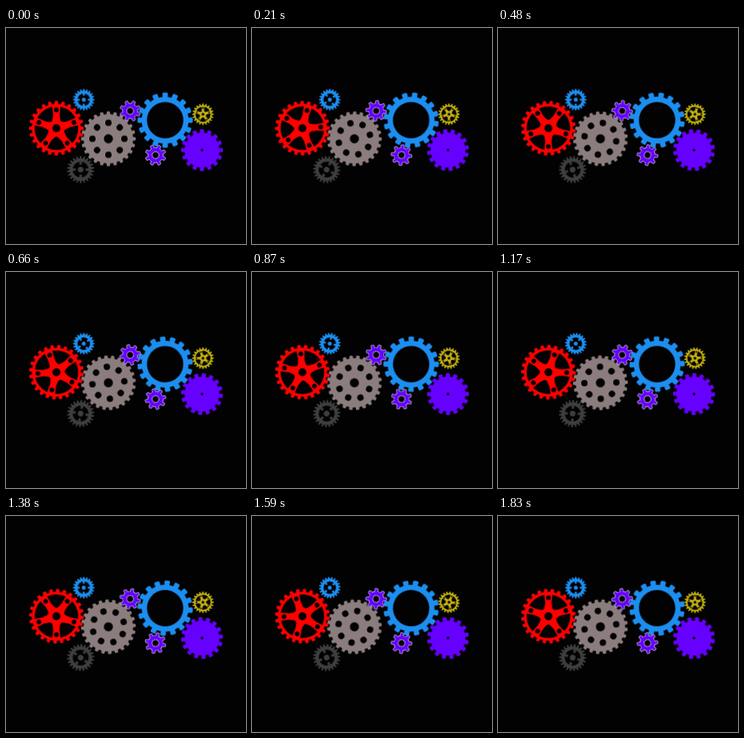
Write an HTML page that moves like this. It is 300 px wide and 270 px high and loops after 1860 ms.

```html
<!DOCTYPE html>
<html lang="en">
<head>
<meta charset="utf-8">
<title>Turning gears</title>
<style>
  html, body { margin: 0; width: 100%; height: 100%; overflow: hidden; background: #020202; }
  svg { display: block; width: 300px; height: 270px; }
  /* A short rest, then one step every 30 ms. */
  .wheel { animation: turn 1860ms -1ms infinite; }
  @keyframes turn {
    0% { transform: rotate(0deg); animation-timing-function: step-end; }
    1.6129% { transform: rotate(0deg); animation-timing-function: steps(61, end); }
    100% { transform: rotate(calc(var(--step) * 61deg)); }
  }
</style>
</head>
<body>
<svg id="stage" viewBox="0 0 300 270"></svg>
<script>
// Degrees per step, clockwise; the pinions have half the teeth of the big blue gear.
const SLOW = 2.4, DOUBLE = 4.8, FAST = 6;
const black = '#020202';
const stage = document.getElementById('stage');

// Point at a clockwise angle from the top, in degrees.
function polar(r, deg) {
  const a = deg * Math.PI / 180;
  return (r * Math.sin(a)).toFixed(2) + ' ' + (-r * Math.cos(a)).toFixed(2);
}

const circle = (r, fill = black, rest = '') => `<circle r="${r}" fill="${fill}" ${rest}/>`;

// Toothed rim; foot and tip are half widths as shares of the pitch.
function teeth(count, root, outer, foot, tip, phase = 0) {
  const pitch = 360 / count;
  const bend = outer - (outer - root) * .35;
  let d = '';
  for (let i = 0; i < count; i++) {
    const mid = phase + i * pitch;
    const at = (r, share) => polar(r, mid + share * pitch);
    d += `${i ? 'L' : 'M'}${at(root, -foot)}L${at(bend, -tip)}` +
      `Q${at(outer, -tip)} ${at(outer, -tip * .55)}L${at(outer, tip * .55)}` +
      `Q${at(outer, tip)} ${at(bend, tip)}L${at(root, foot)}` +
      `A${root} ${root} 0 0 1 ${polar(root, mid + (1 - foot) * pitch)}`;
  }
  return d + 'Z';
}

const rim = (fill, ...shape) => `<path d="${teeth(...shape)}" fill="${fill}"/>`;

function around(count, part) {
  let out = '';
  for (let i = 0; i < count; i++) out += `<g transform="rotate(${i * 360 / count})">${part}</g>`;
  return out;
}

// Five waisted arms with a bolt hole near the end of each.
function arms(fill, r) {
  const arm = `<path d="M-7 -5Q-4 -11 -4 -17L-5.2 -28H5.2L4 -17Q4 -11 7 -5Z" fill="${fill}"/>` +
    `<circle cy="-23" r="3" fill="${black}"/>`;
  return `<g transform="scale(${r / 28})">${circle(10.5, fill)}${around(5, arm)}${circle(5)}</g>`;
}

// Open ring with short stubs pointing at a loose hub.
function slotted(fill, inner, hub, bar) {
  const stub = inner - hub - 2.6;
  return circle(inner) + circle(hub, fill) +
    around(4, `<rect x="${-bar / 2}" y="${-inner - .5}" width="${bar}" height="${stub + .5}" fill="${fill}"/>`);
}

function gear(x, y, step, body) {
  stage.insertAdjacentHTML('beforeend',
    `<g transform="translate(${x} ${y})"><g class="wheel" style="--step:${step}">${body}</g></g>`);
}

const red = '#ff0000', blue = '#1c8ef0', grey = '#8b7d7d';
const dark = '#3e3e3e', violet = '#6600ff', gold = '#c5b211';

gear(63, 125.3, SLOW, rim(red, 24, 30.5, 34.2, .3, .24) + circle(27.3) + arms(red, 28));
gear(128, 138.5, -SLOW, rim(grey, 24, 30.8, 34.2, .3, .24) +
  around(8, `<circle cy="-20" r="4" fill="${black}"/>`) + circle(5.7));
gear(97.2, 89.6, -FAST, rim(blue, 20, 11.3, 13.4, .32, .24) + slotted(blue, 7.8, 2.5, 2.4));
gear(93.3, 177, DOUBLE, rim(dark, 22, 14, 17, .3, .22) + slotted(dark, 10, 3.6, 3));
gear(198.9, 115.2, -SLOW, rim(blue, 16, 29.3, 34.6, .28, .27) + circle(22.8));
gear(245, 152.6, SLOW, rim(violet, 16, 21.8, 26.2, .29, .27) + circle(1.8));
gear(246.2, 107.8, FAST, rim(gold, 20, 11.3, 13.4, .3, .22) + circle(9.4) + arms(gold, 9.8));

const edge = 'stroke="#d8d0ee" stroke-width=".8"';
const pinion = `<path d="${teeth(8, 9.4, 13, .27, .21, 22.5)}" fill="${violet}" ${edge}/>` +
  circle(4.3, black, edge);
gear(155.2, 103.6, DOUBLE, pinion);
gear(186.9, 158.9, DOUBLE, pinion);
</script>
</body>
</html>
```
